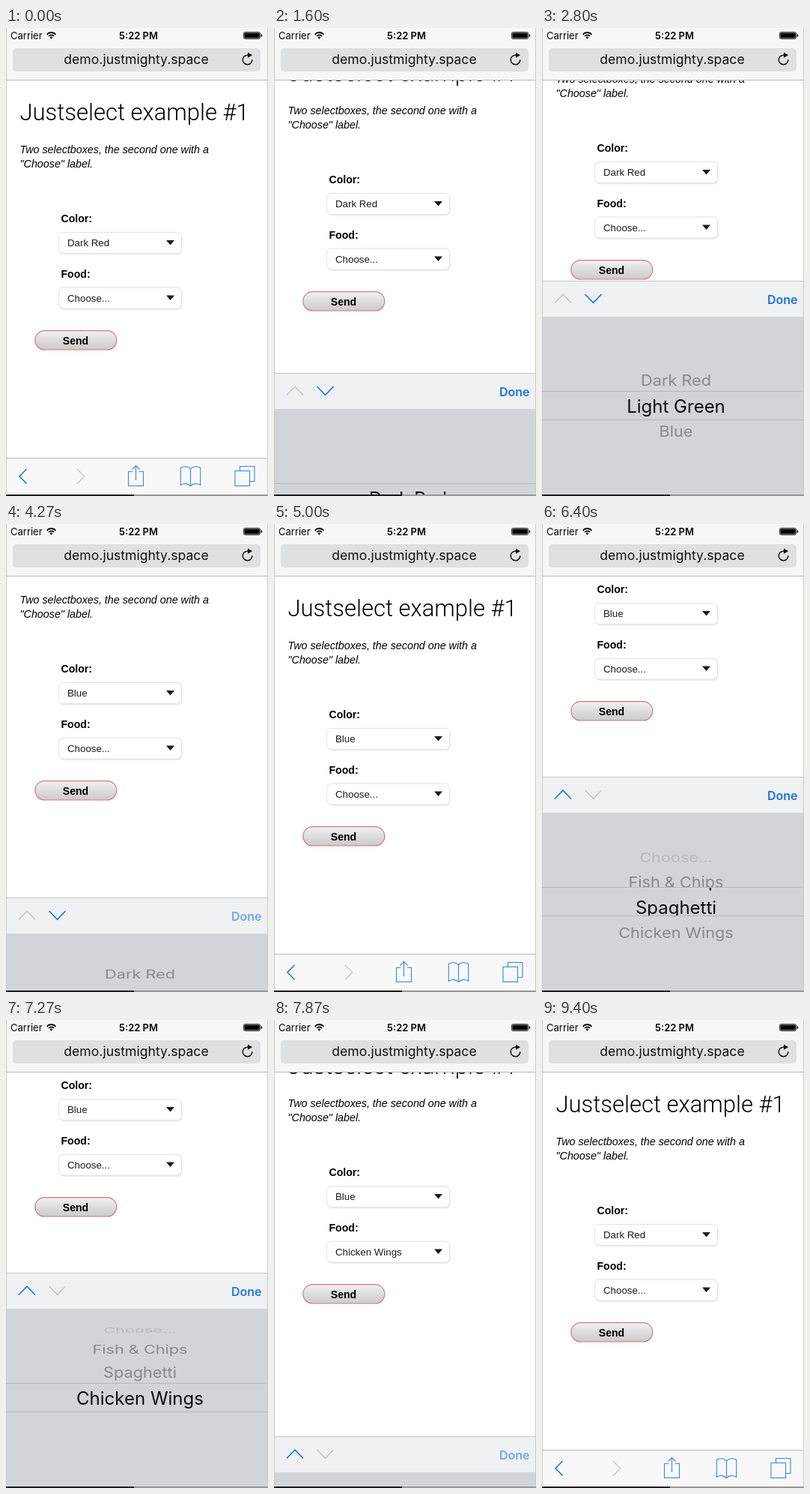
An HTML page with a canvas for the animation above (9.54 s loop, 350x624 px).

```html
<!DOCTYPE html>
<html lang="en">
<head>
<meta charset="utf-8">
<title>Select boxes on a phone</title>
<style>
html, body { margin: 0; width: 100%; height: 100%; overflow: hidden; background: #fff; }
canvas { display: block; width: 350px; height: 624px; }
</style>
</head>
<body>
<canvas id="stage"></canvas>
<script>
const W = 350, H = 624, LOOP = 9540, STEP_MS = 1000 / 15;
const UI = 'Inter, sans-serif', PAGE = '"Liberation Sans", Arial, sans-serif';
const BLUE = '#1c70e0', ICON = '#3f82e6', OFF = '#c3c5c9';
const COLORS = ['Dark Red', 'Light Green', 'Blue'];
const FOODS = ['Choose...', 'Fish & Chips', 'Spaghetti', 'Chicken Wings'];
const PANEL_TOP = 337, BAR = 48, WHEEL_MID = 504;

const canvas = document.getElementById('stage');
const c = canvas.getContext('2d');
const scale = window.devicePixelRatio || 1;
canvas.width = W * scale;
canvas.height = H * scale;

const clamp = v => Math.max(0, Math.min(1, v));
const ramp = (t, start, length) => clamp((t - start) / length);
const easeIn = p => p * p;
const easeOut = p => 1 - (1 - p) ** 2;
const cubicOut = p => 1 - (1 - p) ** 3;
const smooth = p => p * p * (3 - 2 * p);

function text(str, x, y, font, color = '#000', align = 'left') {
  c.font = font;
  c.fillStyle = color;
  c.textAlign = align;
  c.fillText(str, x, y);
}

function rect(x, y, w, h, color) {
  c.fillStyle = color;
  c.fillRect(x, y, w, h);
}

function box(x, y, w, h, r) {
  c.beginPath();
  c.roundRect(x, y, w, h, r);
}

function line(points, color, width = 1.5) {
  c.beginPath();
  points.forEach(([x, y]) => c.lineTo(x, y));
  c.strokeStyle = color;
  c.lineWidth = width;
  c.stroke();
}

function statusBar() {
  rect(0, 0, W, 69, '#f7f7f7');
  rect(0, 69, W, 1, '#b9b9bb');
  text('Carrier', 6, 14.7, '13px ' + UI);
  text('5:22 PM', 177, 14.7, '600 13px ' + UI, '#000', 'center');

  c.strokeStyle = '#000';
  c.lineWidth = 1.8;
  for (const r of [4.6, 8]) {
    c.beginPath();
    c.arc(60.5, 14, r, -Math.PI * 0.76, -Math.PI * 0.24);
    c.stroke();
  }
  c.fillStyle = '#000';
  c.beginPath();
  c.moveTo(60.5, 14.8);
  c.arc(60.5, 14, 2.4, -Math.PI * 0.78, -Math.PI * 0.22);
  c.fill();

  box(317.5, 5.5, 22, 9, 1.8);
  c.lineWidth = 0.8;
  c.stroke();
  box(318.4, 6.4, 20.2, 7.2, 0.8);
  c.fill();
  box(340.6, 8.3, 1.6, 3.6, 0.8);
  c.fill();

  box(9, 27, 331, 31, 5);
  c.fillStyle = '#dfe0e1';
  c.fill();
  text('demo.justmighty.space', 174, 48, '17.6px ' + UI, '#111', 'center');

  c.strokeStyle = '#111';
  c.lineWidth = 1.5;
  c.beginPath();
  c.arc(322.5, 42.5, 6.3, -0.05, Math.PI * 1.62);
  c.stroke();
  c.fillStyle = '#111';
  c.beginPath();
  c.moveTo(323, 32.6);
  c.lineTo(329, 36.2);
  c.lineTo(323, 39.8);
  c.fill();
}

function selectBox(y, value, next, mix) {
  c.save();
  c.shadowColor = 'rgba(0,0,0,.08)';
  c.shadowBlur = scale;
  c.shadowOffsetX = scale;
  c.shadowOffsetY = 2 * scale;
  box(70.5, y + 0.5, 164, 28, 6);
  c.fillStyle = '#fff';
  c.fill();
  c.restore();
  c.strokeStyle = '#e2e2e2';
  c.lineWidth = 1;
  c.stroke();

  c.fillStyle = '#1a1a1a';
  c.beginPath();
  c.moveTo(214, y + 11);
  c.lineTo(225, y + 11);
  c.lineTo(219.5, y + 17.5);
  c.fill();

  const font = '13.3px ' + PAGE;
  c.globalAlpha = 1 - mix;
  text(value, 82, y + 19.2, font, '#1a1a1a');
  c.globalAlpha = mix;
  text(next, 82, y + 19.2, font, '#1a1a1a');
  c.globalAlpha = 1;
}

function page(t, scroll) {
  const reset = ramp(t, 8760, 640);
  const color = t < 4140 ? 'Dark Red' : 'Blue';
  const food = t < 7800 ? 'Choose...' : 'Chicken Wings';
  c.save();
  c.translate(0, -scroll);
  text('Justselect example #1', 18.5, 122.5, '300 31px Roboto, sans-serif');
  const note = 'italic 14.3px ' + PAGE;
  text('Two selectboxes, the second one with a', 18.5, 167, note);
  text('"Choose" label.', 18.5, 185.8, note);

  const bold = 'bold 14.1px ' + PAGE;
  text('Color:', 73.5, 259.2, bold);
  selectBox(272, color, 'Dark Red', reset);
  text('Food:', 73.5, 332.7, bold);
  selectBox(345.5, food, 'Choose...', reset);

  const shade = c.createLinearGradient(0, 403, 0, 429);
  shade.addColorStop(0, '#f4f4f4');
  shade.addColorStop(0.5, '#dddddd');
  shade.addColorStop(1, '#cbcbcd');
  box(38.8, 403.6, 109, 25.4, 12.7);
  c.fillStyle = shade;
  c.fill();
  c.strokeStyle = '#d4787d';
  c.lineWidth = 1.2;
  c.stroke();
  text('Send', 93, 421.5, bold, '#000', 'center');
  c.restore();
}

function toolbar() {
  rect(0, 573, W, 49, '#f8f8f8');
  rect(0, 573, W, 1, '#b9b9bb');
  line([[27.5, 588], [18, 597.7], [27.5, 607.5]], BLUE, 1.5);
  line([[95, 588], [104.5, 597.7], [95, 607.5]], '#c9c9cb', 1.5);

  // share
  line([[169, 591.5], [163.5, 591.5], [163.5, 610.5], [183.5, 610.5], [183.5, 591.5], [178, 591.5]], ICON, 1.1);
  line([[173.5, 603], [173.5, 583.5]], ICON, 1.1);
  line([[168.5, 588.5], [173.5, 583.5], [178.5, 588.5]], ICON, 1.1);

  // book
  c.beginPath();
  for (const side of [-1, 1]) {
    const x = d => 246.5 + side * d;
    c.moveTo(x(0), 588);
    c.bezierCurveTo(x(3), 584, x(9), 584, x(13.2), 586.5);
    c.lineTo(x(13.2), 609.5);
    c.bezierCurveTo(x(9), 606.5, x(3), 607, x(0), 611);
  }
  c.moveTo(246.5, 588);
  c.lineTo(246.5, 611);
  c.stroke();

  // tabs
  line([[312.5, 590], [312.5, 584.5], [332, 584.5], [332, 604.5], [326, 604.5]], ICON, 1.1);
  c.strokeRect(306, 590.5, 19.5, 20);
}

// Rows lie on a cylinder; the band in the middle shows a flat, larger copy.
function wheel(rows, pos) {
  const R = 116, TURN = 0.297, PITCH = 36;
  const hasHint = rows === FOODS;
  c.save();
  c.beginPath();
  c.rect(0, PANEL_TOP + BAR, W, 100);
  c.rect(0, 522, W, 102);
  c.clip();
  rows.forEach((row, i) => {
    const angle = (i - pos) * TURN;
    c.save();
    c.translate(179, WHEEL_MID + R * Math.sin(angle));
    c.scale(1, Math.cos(angle) ** 1.8);
    text(row, 0, 8, '21.7px ' + UI, hasHint && !i ? '#b5b8bd' : '#87898e', 'center');
    c.restore();
  });
  c.restore();

  c.save();
  c.beginPath();
  c.rect(0, 485, W, 37);
  c.clip();
  rows.forEach((row, i) => {
    text(row, 179, WHEEL_MID + (i - pos) * PITCH + 8.8, '24px ' + UI,
      hasHint && !i ? '#999ca1' : '#0c0c0d', 'center');
  });
  c.restore();
  rect(0, 484, W, 1, '#b5b8bd');
  rect(0, 522, W, 1, '#b5b8bd');
}

function panel(shown, rows, pos, doneAlpha) {
  if (shown <= 0) return;
  c.save();
  c.beginPath();
  c.rect(0, 0, W, 622);
  c.clip();
  c.translate(0, Math.round((1 - shown) * (H - PANEL_TOP)));
  rect(0, PANEL_TOP, W, BAR, '#eff1f3');
  rect(0, PANEL_TOP, W, 1, '#c3c5c8');
  rect(0, PANEL_TOP + BAR, W, 240, '#d1d4d9');

  const second = rows === FOODS;
  line([[17, 366.5], [28, 355.2], [39, 366.5]], second ? BLUE : OFF, 1.6);
  line([[57.5, 355], [68.5, 366.3], [79.5, 355]], second ? OFF : BLUE, 1.6);
  c.globalAlpha = doneAlpha;
  text('Done', 341.5, 367.8, '600 16px ' + UI, BLUE, 'right');
  c.globalAlpha = 1;
  wheel(rows, pos);
  c.restore();
}

function colorPos(t) {
  return smooth(ramp(t, 2270, 510)) + 0.95 * smooth(ramp(t, 2810, 480)) + 0.05 * ramp(t, 3300, 170);
}

function foodPos(t) {
  return 1.79 * easeIn(ramp(t, 5870, 530)) + 1.14 * easeOut(ramp(t, 6400, 470)) + 0.07 * ramp(t, 6880, 190);
}

function draw(t) {
  const second = t >= 4800;
  const open = second ? 5023 : 1470;
  const close = second ? 7666 : 4140;
  const closing = t >= (second ? 7790 : close);
  const rise = cubicOut(ramp(t, open, 530));
  const lift = cubicOut(ramp(t, open + 5, 530));
  const fall = closing ? cubicOut(ramp(t, close, 530)) : 0;
  const back = closing ? cubicOut(ramp(t, close + 73, 393)) : 0;
  const scroll = Math.round((second ? 167 : 94) * (lift - back));
  const press = ramp(t, second ? 7230 : 3830, second ? 370 : 270);

  c.setTransform(scale, 0, 0, scale, 0, 0);
  rect(0, 0, W, H, '#fff');
  page(t, scroll);
  statusBar();
  toolbar();
  panel(rise - fall, second ? FOODS : COLORS, second ? foodPos(t) : colorPos(t), 1 - 0.42 * press);

  rect(0, 0, 1, 622, '#c9c9cb');
  rect(349, 0, 1, 622, '#c9c9cb');
  rect(0, 622, 171, 2, '#1c1c1d');
  rect(171, 622, 179, 2, '#98989a');
}

const begin = performance.now();
function tick() {
  const t = (performance.now() - begin) % LOOP;
  draw(Math.floor(t / STEP_MS) * STEP_MS);
  requestAnimationFrame(tick);
}
tick();
</script>
</body>
</html>
```
